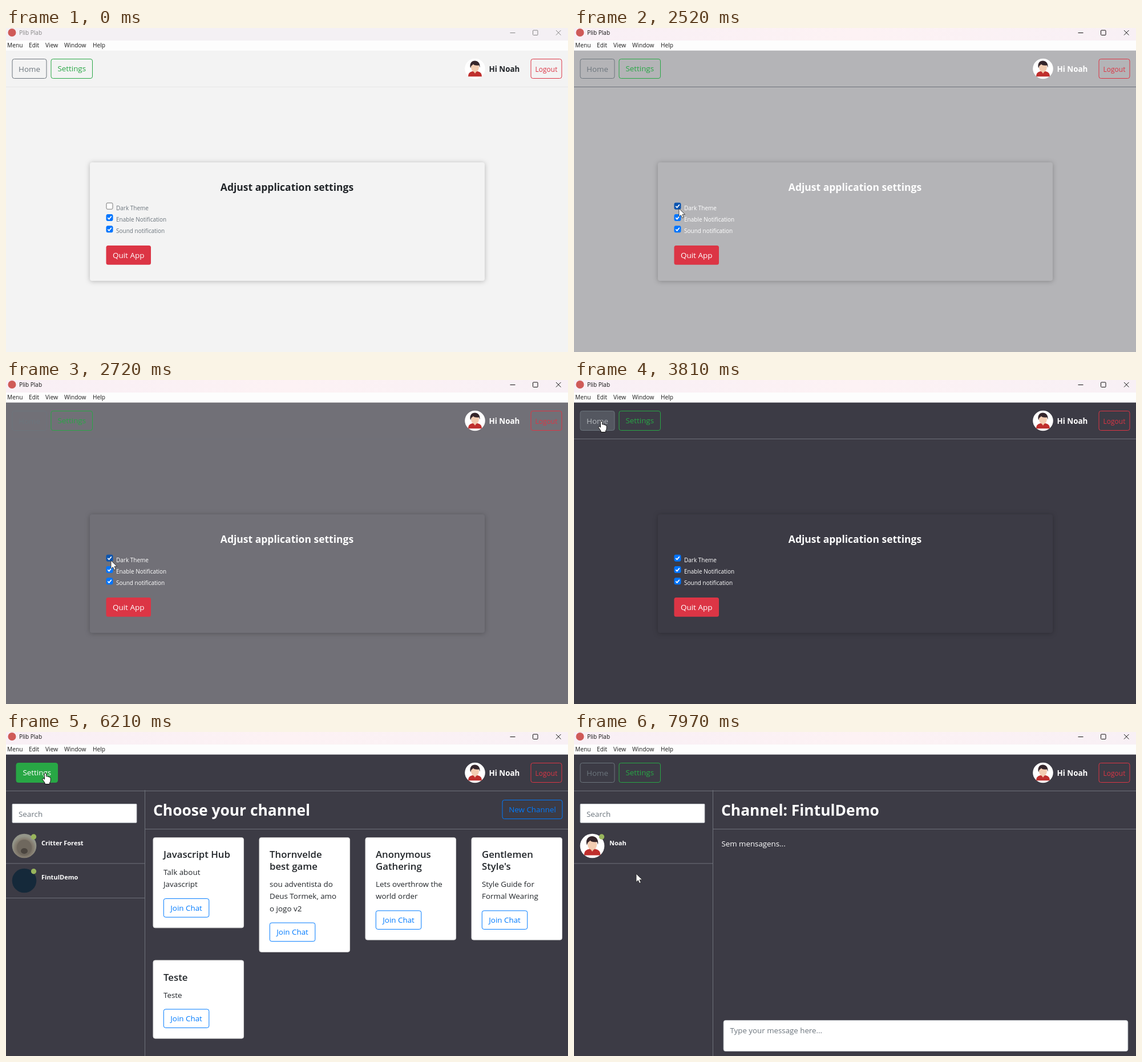
An HTML page that plays this animation: 985 by 569 pixels, repeating every 8 s.

```html
<!DOCTYPE html>
<html lang="en">
<head>
<meta charset="utf-8">
<title>Chat app</title>
<style>
  html, body { margin: 0; width: 100%; height: 100%; overflow: hidden; }
  svg { display: block; width: 985px; height: 569px; --bg: #f3f3f3; --fg: #212529; --label: #6c757d; --line: #e4e4e4; }
  text { font-family: "Open Sans", "Noto Sans", sans-serif; white-space: pre; }
  .card { fill: var(--bg); filter: drop-shadow(0 1px 4px rgba(0, 0, 0, .25)); }
</style>
</head>
<body>
<svg id="stage" viewBox="0 0 985 569"></svg>
<script>
const LOOP = 8000, CHECK = 2230, THEME = 2300, HOME = 3960, CHANNEL = 7910, FOCUS = 70;
const GRAY = '#6c757d', GREEN = '#28a745', RED = '#dc3545', BLUE = '#007bff', INK = '#212529';
const FG = 'var(--fg)', LINE = 'var(--line)', LEADING = 21.24;

// Markup helpers
const text = (x, y, str, size, fill, weight = 400, extra = '') =>
  `<text x="${x}" y="${y}" font-size="${size}" font-weight="${weight}" style="fill:${fill}" ${extra}>${str}</text>`;
const rect = (x, y, w, h, fill, r = 0, extra = '') =>
  `<rect x="${x}" y="${y}" width="${w}" height="${h}" rx="${r}" style="fill:${fill}" ${extra}/>`;
const circle = (x, y, r, fill) => `<circle cx="${x}" cy="${y}" r="${r}" fill="${fill}"/>`;
const hline = (x, y, w) => rect(x, y, w, 1, LINE);
const panel = (x, y, w, h, r, border) =>
  rect(x + .45, y + .45, w - .9, h - .9, '#fff', r, `stroke="${border}" stroke-width=".9"`);
const button = (x, y, w, h, label, color, base, size = 13.4) =>
  `<g class="btn" data-box="${[x, y, w, h]}" data-color="${color}">` +
  rect(x + .5, y + .5, w - 1, h - 1, color, 3.5, `stroke="${color}" fill-opacity="0"`) +
  text(x + w / 2, y + base, label, size, color, 400, 'text-anchor="middle"') + '</g>';
const group = (id, body) => `<g id="${id}">${body}</g>`;

const avatar = (x, y, r) => `<g transform="translate(${x} ${y}) scale(${r / 18})">` +
  circle(0, 0, 18, '#fff') +
  '<path d="M-12 14C-12 7-9 6-4 4.5H4C9 6 12 7 12 14Z" fill="#bf2f2d"/>' +
  '<path d="M-4 3L0 8.5 4 3Z" fill="#eec3a6"/>' +
  '<ellipse cy="-2.5" rx="7" ry="8.5" fill="#f3cdb2"/>' +
  '<path d="M-8 -1C-13 -18 11 -19 8.5 -2L7 -6Q-1 -5 -3 -8 -5 -6 -6.5 -5Z" fill="#35262b"/></g>';

const animal = circle(32, 200, 21.3, 'url(#fur)') +
  '<ellipse cx="32" cy="203" rx="13" ry="14" fill="#6f685e"/><ellipse cx="32" cy="209" rx="6" ry="5" fill="#4b453f"/>';

const row = (i, name, picture) => picture + circle(48.5, 184 + 60.7 * i, 4.7, '#98b55c') +
  text(62, 198.5 + 60.7 * i, name, 11, '#fff', 700) + hline(0, 230.4 + 60.7 * i, 243);

const checkbox = (i, label) => {
  const y = 307.2 + 20.3 * i;
  return `<g class="check">${rect(176, y, 11, 11, '#fff', 2, 'stroke="#767676"')}` +
    `<path d="M178.3 ${y + 5.7}l2.3 2.4 4.2-5.2" fill="none" stroke="#fff" stroke-width="1.7"/></g>` +
    text(193, y + 12.3, label, 10, 'var(--label)');
};

const channelCard = (x, y, title, body) => {
  const titleY = y + 36, bodyY = titleY + LEADING * (title.length - 1) + 30;
  const btnY = y + 43.4 + LEADING * (title.length + body.length);
  return panel(x, y, 159.5, btnY + 52.2 - y, 3.5, '#dfdfdf') +
    title.map((s, i) => text(x + 18.5, titleY + LEADING * i, s, 16.8, INK, 600)).join('') +
    body.map((s, i) => text(x + 18.5, bodyY + LEADING * i, s, 13.4, INK)).join('') +
    button(x + 18.3, btnY, 80.5, 33.6, 'Join Chat', BLUE, 21.8);
};

const sidebar = panel(10.6, 126, 218.8, 33.7, 1, '#ced4da') + text(22, 149, 'Search', 13.4, GRAY) +
  rect(243, 102, 1, 467, LINE) + hline(244, 170, 741);
const homeBtn = button(10.5, 54, 61, 35, 'Home', GRAY, 23);
const settingsBtn = x => button(x, 54, 73.5, 35, 'Settings', GREEN, 22);
const heading = s => text(258, 147, s, 26.4, '#fff', 700);

const stage = document.getElementById('stage');
stage.innerHTML = `<defs><radialGradient id="fur" cy=".6"><stop offset=".3" stop-color="#5f584f"/>
  <stop offset=".75" stop-color="#857d70"/><stop offset="1" stop-color="#94968a"/></radialGradient>
  <linearGradient id="bar"><stop stop-color="#f8eff5"/><stop offset=".5" stop-color="#fdf2f4"/><stop offset="1" stop-color="#f8f0f5"/></linearGradient></defs>` +
  rect(0, 0, 985, 569, 'var(--bg)') +
  rect(0, 0, 985, 22, 'url(#bar)', 0, 'id="titlebar"') + rect(0, 22, 985, 17.6, '#fdfdfd') +
  circle(10.5, 8, 7, '#cf5a58') +
  group('caption', text(23, 12.3, 'Plib Plab', 10, 'currentColor') +
    '<path d="M883.5 8.5h9M964 4l8.5 8.5M972.5 4l-8.5 8.5" fill="none" stroke="currentColor"/>' +
    '<rect x="923.5" y="4" width="8.5" height="8.5" rx="1" fill="none" stroke="currentColor"/>') +
  [['Menu', 2], ['Edit', 40], ['View', 69], ['Window', 102], ['Help', 152]]
    .map(([s, x]) => text(x, 34.3, s, 10.2, '#1b1b1b')).join('') +
  hline(0, 103, 985) +
  avatar(822, 71.5, 17.8) + text(846.5, 77, 'Hi Noah', 13.4, FG, 700) +
  button(919.5, 54, 55, 35, 'Logout', RED, 23, 12) +
  group('settings', homeBtn + settingsBtn(78.5) +
    '<rect class="card" x="147" y="236" width="692" height="208" rx="4"/>' +
    text(492.5, 286, 'Adjust application settings', 17.5, FG, 700, 'text-anchor="middle"') +
    ['Dark Theme', 'Enable Notification', 'Sound notification'].map((s, i) => checkbox(i, s)).join('') +
    rect(175.5, 382, 78.5, 33.7, RED, 3.5) + text(214.7, 404, 'Quit App', 13.5, '#fff', 400, 'text-anchor="middle"')) +
  group('home', settingsBtn(17.5) +
    [0, 1].map(i => rect(0, 170 + 60.7 * i, 243, 60.7, '#6e717d', 0, 'class="row"')).join('') + sidebar +
    row(0, 'Critter Forest', animal) + row(1, 'FintulDemo', circle(32, 261, 21.3, '#15293a')) +
    heading('Choose your channel') + button(869.5, 119, 106, 34, 'New Channel', BLUE, 22) +
    channelCard(257.5, 185, ['Javascript Hub'], ['Talk about', 'Javascript']) +
    channelCard(443.5, 185, ['Thornvelde', 'best game'], ['sou adventista do', 'Deus Tormek, amo', 'o jogo v2']) +
    channelCard(629.5, 185, ['Anonymous', 'Gathering'], ['Lets overthrow the', 'world order']) +
    channelCard(815.5, 185, ['Gentlemen', "Style's"], ['Style Guide for', 'Formal Wearing']) +
    channelCard(257.5, 400.5, ['Teste'], ['Teste'])) +
  group('channel', homeBtn + settingsBtn(78.5) + sidebar + row(0, 'Noah', avatar(32, 200, 21.3)) +
    heading('Channel: FintulDemo') + text(258.5, 201, 'Sem mensagens...', 13.3, '#fff') +
    panel(261.7, 506, 709.5, 55, 3.5, '#ced4da') + text(273.5, 528.5, 'Type your message here...', 13.3, GRAY)) +
  group('pointer',
    '<path id="arrow" d="M0 0V14.6L3.4 11.4 5.7 16.6 8.2 15.5 6 10.4H10.6Z" fill="#fff" stroke="#222" stroke-width=".8"/>' +
    '<path id="hand" d="M-1.6 1.2Q0 -.8 1.6 1.2V6Q3.4 5 4.6 6.7 6.3 5.9 7.2 7.5 9 7 9.2 9.4V13Q9 16 7.4 17.3V19.5H-.8V17.6L-5 11.4Q-5.4 9 -3.2 9.6L-1.6 11.2Z" fill="#fff" stroke="#111"/>');

const $ = id => document.getElementById(id);
const views = ['settings', 'home', 'channel'].map($);
const buttons = [...stage.querySelectorAll('.btn')].map(g => ({
  frame: g.firstChild, label: g.lastChild, view: g.parentNode,
  box: g.dataset.box.split(',').map(Number),
  rgb: [1, 3, 5].map(i => parseInt(g.dataset.color.slice(i, i + 2), 16))
}));
const rows = [...stage.querySelectorAll('.row')];
const checks = [...stage.querySelectorAll('.check')];

// Pointer path: time, x, y
const path = [
  [100, 395, 550], [140, 380, 538], [480, 290, 400], [820, 196, 298], [950, 180, 292], [1170, 183, 317],
  [1499, 183, 317], [1500, 184, 317], [3000, 184, 317], [3400, 120, 170], [3810, 48, 72],
  [4300, 48, 72], [4570, 136, 211], [4850, 150, 262], [5110, 190, 298], [5450, 364, 409],
  [5650, 235, 320], [5800, 150, 180], [5930, 88, 76], [6060, 74, 72], [6210, 69, 72],
  [7069, 69, 72], [7070, 68, 73], [7280, 68, 73], [7560, 95, 195], [7770, 111, 250], [7910, 109, 249], [8000, 109, 249]
];
const mix = (a, b, k) => a + (b - a) * k;
const pointerAt = t => {
  const i = path.findIndex(p => p[0] > t);
  if (i < 1) return [-99, -99];
  const [a, b] = [path[i - 1], path[i]], k = (t - a[0]) / (b[0] - a[0]);
  return [mix(a[1], b[1], k), mix(a[2], b[2], k)];
};
const inside = ([px, py], [x, y, w, h]) => px >= x && px < x + w && py >= y && py < y + h;

// CSS "ease" curve
const ease = x => {
  if (x <= 0 || x >= 1) return x <= 0 ? 0 : 1;
  const bez = (a, b, s) => 3 * a * s * (1 - s) ** 2 + 3 * b * s * s * (1 - s) + s ** 3;
  let lo = 0, hi = 1;
  for (let i = 0; i < 20; i++) {
    const s = (lo + hi) / 2;
    if (bez(.25, .25, s) < x) lo = s; else hi = s;
  }
  return bez(.1, 1, lo);
};
// Share of the last 150 ms that the pointer spent in the box
const hoverAmount = (t, box) => {
  let sum = 0;
  for (let i = 0; i < 10; i++) sum += inside(pointerAt(t - i * 15), box);
  return sum / 10;
};

function draw(t) {
  const dark = t >= THEME, focused = t >= FOCUS, k = ease((t - THEME) / 1000);
  const view = views[t < HOME ? 0 : t < CHANNEL ? 1 : 2];
  const pos = pointerAt(t);
  views.forEach(v => v.style.display = v === view ? '' : 'none');

  const set = (name, value) => stage.style.setProperty(name, value);
  set('--bg', `rgb(${mix(243, 60, k)},${mix(243, 59, k)},${mix(243, 69, k)})`);
  set('--fg', dark ? '#fff' : INK);
  set('--label', dark ? '#fff' : GRAY);
  set('--line', dark ? '#6e717a' : '#e6e6e6');
  $('titlebar').style.fill = focused ? 'url(#bar)' : '#f4f0f4';
  $('caption').style.color = focused ? '#111' : '#858585';

  let hand = false;
  for (const b of buttons) {
    if (b.view !== view) continue;
    const h = hoverAmount(t, b.box);
    b.frame.setAttribute('fill-opacity', h);
    b.label.style.fill = `rgb(${b.rgb.map(c => mix(c, 255, h))})`;
    hand ||= inside(pos, b.box);
  }
  rows.forEach((r, i) => {
    const over = view === views[1] && inside(pos, [0, 170 + 60.7 * i, 243, 60.7]);
    r.style.display = over ? '' : 'none';
    hand ||= over;
  });
  checks.forEach((c, i) => {
    const on = i > 0 || t >= CHECK, over = inside(pos, [175.5, 306.7 + 20.3 * i, 12, 12]);
    const blue = over ? '#0b55b0' : '#0075ff';
    c.firstChild.style.fill = on ? blue : '#fff';
    c.firstChild.style.stroke = on ? blue : over ? '#4f4f4f' : '#767676';
    c.lastChild.style.display = on ? '' : 'none';
  });
  $('pointer').setAttribute('transform', `translate(${pos.map(Math.round)})`);
  $('arrow').style.display = hand ? 'none' : '';
  $('hand').style.display = hand ? '' : 'none';
}

const start = performance.now();
function tick() {
  draw((performance.now() - start) % LOOP);
  requestAnimationFrame(tick);
}
tick();
</script>
</body>
</html>
```
